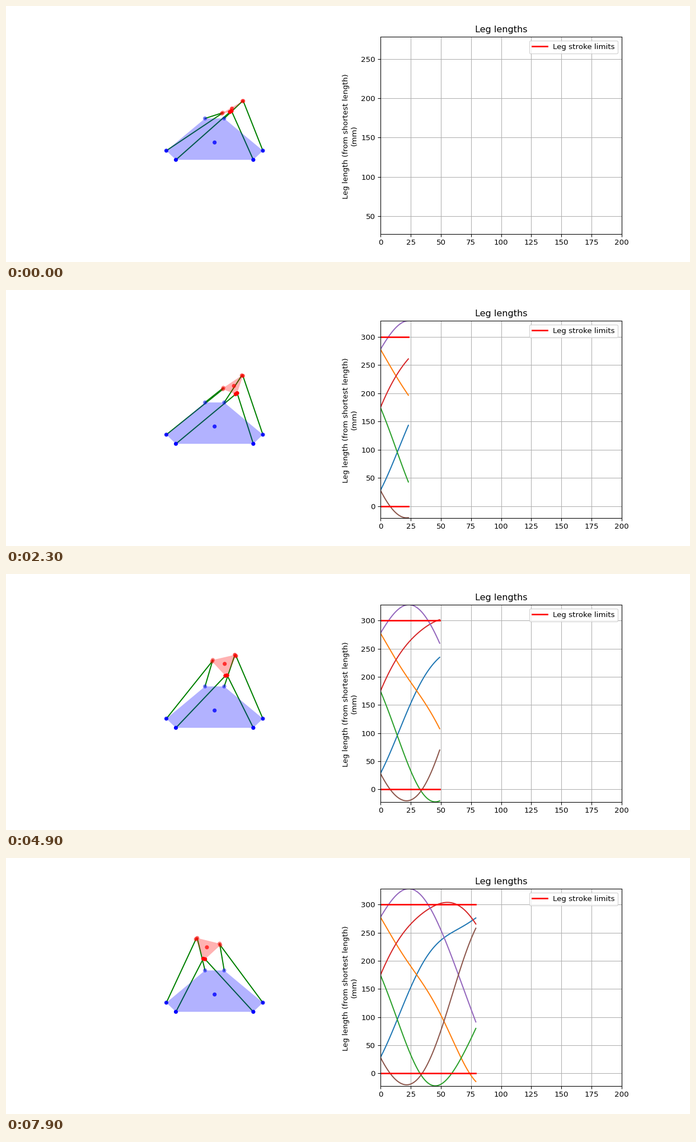
Recreate the animation shown at these times as a matplotlib script. Size 1222 by 458 pixels, loop 8000 ms.

```python
import numpy as np
import matplotlib.pyplot as plt
from matplotlib.animation import FuncAnimation

W, H, DPI = 1222, 458, 96
FRAMES, INTERVAL = 80, 100

# Hexapod geometry, in millimetres and radians
BASE_R, BASE_GAP = 785, 0.2
PLATE_R, PLATE_GAP = 220, 0.068
ORBIT_R, HEIGHT = 303, 770
TILT = np.radians(40)
SHORTEST, STROKE = 899, 300
STEPS_PER_TURN, START = 199, 0.005

# Camera: stage centre, pixels per millimetre, perspective strength
CENTRE = np.array([372.7, 226.5])
SCALE_XY, SCALE_Z = 0.115, 0.1026
FLOOR = -20.5
PERSPECTIVE = 0.000525
AZIMUTH = ELEVATION = np.radians(30)


def ring(radius, pairs, gaps):
    angles = np.radians(pairs) + gaps
    return np.stack([radius * np.cos(angles), radius * np.sin(angles), 0 * angles], axis=1)


# Six legs, counter-clockwise: each joins one base joint to one plate joint
sides = np.array([1, -1] * 3)
base = ring(BASE_R, [0, 120, 120, 240, 240, 360], BASE_GAP * sides)
plate = ring(PLATE_R, [60, 60, 180, 180, 300, 300], -PLATE_GAP * sides)


def pose(step):
    """Plate joints and centre: the plate circles, always leaning inwards."""
    turn = 2 * np.pi * step / STEPS_PER_TURN + START
    roll, pitch = TILT * np.sin(turn), -TILT * np.cos(turn)
    cr, sr, cp, sp = np.cos(roll), np.sin(roll), np.cos(pitch), np.sin(pitch)
    rotation = np.array([[cp, sp * sr, sp * cr], [0, cr, -sr], [-sp, cp * sr, cp * cr]])
    centre = np.array([ORBIT_R * np.cos(turn), ORBIT_R * np.sin(turn), HEIGHT])
    return plate @ rotation.T + centre, centre


def project(points):
    """Stage positions in pixels, and distance away from the viewer."""
    x, y, z = np.transpose(points) * np.array([[SCALE_XY], [SCALE_XY], [SCALE_Z]])
    z = z + FLOOR
    across = x * np.cos(AZIMUTH) + y * np.sin(AZIMUTH)
    back = y * np.cos(AZIMUTH) - x * np.sin(AZIMUTH)
    up = back * np.sin(ELEVATION) + z * np.cos(ELEVATION)
    depth = back * np.cos(ELEVATION) - z * np.sin(ELEVATION)
    zoom = 1 / (1 + PERSPECTIVE * depth)
    return CENTRE + np.stack([across * zoom, -up * zoom], axis=1), depth


def shade(color, depth):
    """Fade the far joints."""
    alphas = 1 - 0.5 * (depth - depth.min()) / np.ptp(depth)
    return [(*color, a) for a in alphas]


lengths = np.array([np.linalg.norm(pose(i)[0] - base, axis=1)
                    for i in range(FRAMES)]) - SHORTEST
low = np.minimum.accumulate(lengths.min(axis=1))
high = np.maximum.accumulate(lengths.max(axis=1))

fig = plt.figure(figsize=(W / DPI, H / DPI), dpi=DPI, facecolor="white")

# Robot view
view = fig.add_axes([0, 0, 1, 1])
view.set(xlim=(0, W), ylim=(H, 0))
view.axis("off")
DOT = dict(s=29, linewidths=0, zorder=4)
FILL = dict(alpha=0.3, lw=0, zorder=3)
struts = [view.plot([], [], color="green", lw=1.5, zorder=2)[0] for _ in base]
anchors, anchor_depth = project(np.vstack([base, np.zeros(3)]))
feet = anchors[:6]
view.fill(*feet.T, color="blue", **FILL)
top = view.fill(*feet.T, color="red", **FILL)[0]
view.scatter(*anchors.T, color=shade((0, 0, 1), anchor_depth), **DOT)
joints = view.scatter(*anchors.T, **DOT)

# Length chart
chart = fig.add_subplot(122)
chart.set_title("Leg lengths")
chart.set_ylabel("Leg length (from shortest length) \n(mm)")
chart.set_xlim(0, 200)
chart.grid(True)
curves = [chart.plot([], [], lw=1.5)[0] for _ in base]
limits = [chart.plot([], [], color="red", lw=2)[0] for _ in range(2)]
chart.legend(limits[:1], ["Leg stroke limits"], loc="upper right")


def draw(i):
    tips, centre = pose(i)
    spots, depth = project(np.vstack([tips, centre]))
    for strut, foot, tip in zip(struts, feet, spots):
        strut.set_data(*np.transpose([foot, tip]))
    top.set_xy(spots[:6])
    order = np.argsort(-depth)
    joints.set_offsets(spots[order])
    joints.set_facecolors(shade((1, 0, 0), depth[order]))

    steps = np.arange(i + 1)
    for curve, data in zip(curves, lengths.T):
        curve.set_data(steps, data[:i + 1])
    for line, level in zip(limits, (0, STROKE)):
        line.set_data([0, i], [level, level])
    chart.set_ylim(low[i], high[i])
    return []


anim = FuncAnimation(fig, draw, frames=FRAMES, interval=INTERVAL,
                     init_func=lambda: draw(0), repeat=True, blit=False)
plt.show()
```
